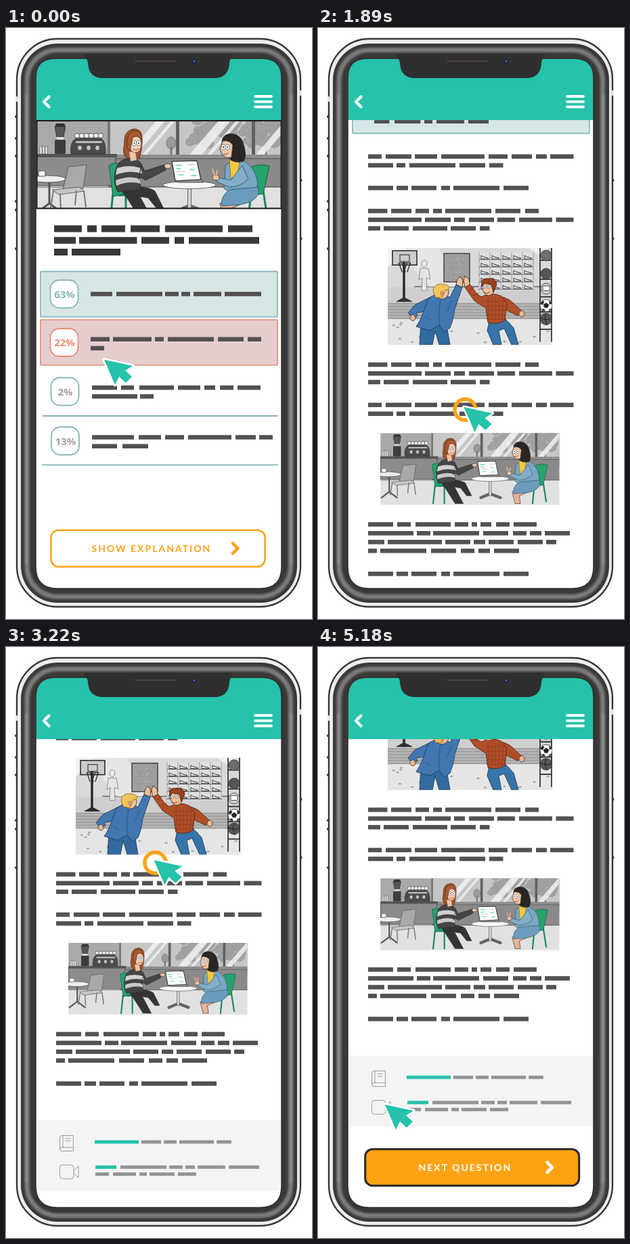
Animation of 452 by 873 pixels, one loop 5.25 s. Source, as an HTML page:

```html
<!DOCTYPE html>
<html lang="en">
<head>
<meta charset="utf-8">
<title>Quiz app walkthrough</title>
<style>
html, body { margin: 0; width: 100%; height: 100%; overflow: hidden; background: #fff; }
svg { display: block; width: 452px; height: 873px; }
.label { font: 700 14px Lato, sans-serif; letter-spacing: 2px; }
.badge { font: 700 15px "Open Sans", sans-serif; text-anchor: middle; }
.sign { font: 700 7px "Open Sans", sans-serif; text-anchor: middle; }
</style>
</head>
<body>
<svg id="stage" viewBox="0 0 452 873"></svg>
<script>
const TEAL = '#26c2aa', ORANGE = '#faa41a', INK = '#3a3837', BAR = '#545152', SOFT = '#86b5bd', RED = '#ec8a77';

const box = (x, y, x2, y2, fill, r = 0, extra = '') =>
  `<rect x="${x}" y="${y}" width="${x2 - x}" height="${y2 - y}" rx="${r}" fill="${fill}" ${extra}/>`;
const shape = (d, fill, stroke = '#333', w = 0.9) =>
  `<path d="${d}" fill="${fill}" stroke="${stroke}" stroke-width="${w}" stroke-linejoin="round"/>`;
const line = (d, stroke, w = 1) =>
  `<path d="${d}" fill="none" stroke="${stroke}" stroke-width="${w}" stroke-linecap="round" stroke-linejoin="round"/>`;
const oval = (x, y, rx, ry, fill, stroke = '#333', w = 0.8) =>
  `<ellipse cx="${x}" cy="${y}" rx="${rx}" ry="${ry}" fill="${fill}" stroke="${stroke}" stroke-width="${w}"/>`;
const eyes = (x, y, gap, r) => [0, gap].map(d =>
  oval(x + d, y, r, r * 1.2, '#fff', '#333', 0.5) + oval(x + d, y, r / 3, r / 3, '#222', 'none')).join('');
const many = (n, fn) => Array.from({ length: n }, (_, i) => fn(i)).join('');
let seed = 7;
const rnd = () => (seed = seed * 16807 % 2147483647) / 2147483647;

// A row of word bars: "start-end start-end ..."
const row = (y, words, h = 6.5, fill = BAR) => words.split(' ').map(w => {
  const [a, b] = w.split('-').map(Number);
  return box(a, y, b, y + h, fill);
}).join('');

const paraA = y =>
  row(y, '74-94 100-138 143-176 182-246 252-280 286-316 322-338 343-377.5') +
  row(y + 13, '74-111 116-129 135-203 209-247 253-273.5');
const paraB = y => row(y, '74-111 116-133 138-175 182-195 200-268 274-311');
const paraC = y =>
  row(y, '74-102.5 108-138 144-164 170-183 188-256 262-299 306-326') +
  row(y + 13, '74-153 158-196 201-217 223-260 265-291 297-346 351.5-377.5') +
  row(y + 25.7, '74-92 97-134 140-191 196-233 239-253.5');
const paraD = y =>
  row(y, '74-111 117-137 144-196 202-222 227-235 240-256 263-283 289-323') +
  row(y + 13, '74-141 146-166 170-238 244-281 288-308 313-330 335-372') +
  row(y + 26, '74-98 103-183 188-225 230-247 252-289 295-332 337-352') +
  row(y + 39, '74-87 92-160 167-204 211-231 237-254 260-297');

const streak = (x, w) => `<path d="M${x} 0h${w}l-58 68h${-w}z" fill="#f2f2f2" opacity=".85"/>`;

const cafe = () =>
  box(0, -3, 372, 70, '#a9a9a9') + box(104, -3, 372, 67, '#c6c6c6') +
  many(46, () => oval(226 + rnd() * 140, rnd() * 34, 5 + rnd() * 6, 5 + rnd() * 5, '#a2a2a2', '#8f8f8f', 0.4)) +
  oval(198, 33, 7, 9, '#9a9a9a', '#777') + line('M198 40v26M338 36v30', '#777', 3) +
  streak(176, 13) + streak(198, 6) + streak(268, 18) + streak(294, 6) + streak(366, 12) +
  box(205, -3, 210, 67, '#606060') + box(317, -3, 322, 67, '#606060') + box(104, -3, 108, 60, '#777') +
  box(106, 50, 372, 56, '#8e8e8e') + box(106, 56, 372, 98, '#8a8a8a', 0, 'stroke="#555"') +
  box(0, 98, 372, 150, '#e1e1e1') + line('M0 98H372', '#555') +
  box(0, 52, 116, 96, '#8c8c8c', 0, 'stroke="#444"') + box(0, 49, 118, 54, '#545454') +
  // grinder, cups and espresso machine
  shape('M26 8h16l-3 16h-10z', '#555') + box(29, 24, 39, 28, '#ddd') + box(26, 28, 42, 49, '#3c3c3c', 2) +
  box(27, 4, 41, 9, '#333', 2) + many(3, i => box(4 + i * 4, 38, 7 + i * 4, 49, '#ececec', 0, 'stroke="#555" stroke-width=".6"')) +
  shape('M50 49Q48 30 58 26H94Q102 30 101 49Z', '#4b4b4b') + box(57, 30, 96, 33, '#bcbcbc', 1) +
  many(3, i => oval(63 + i * 13, 40, 3.5, 4, '#c2c2c2')) + many(6, i => oval(59 + i * 7, 22, 4, 3.5, '#efefef')) +
  // empty table and chair
  line('M18 88V122M18 122L2 134M18 122L34 134', '#555', 3) + oval(16, 86, 26, 5, '#eee', '#444') +
  box(2, 74, 12, 82, '#f4f4f4', 2, 'stroke="#555"') +
  shape('M46 68L73 65L68 100L38 102Z', '#a9a9a9', '#555') + shape('M22 102L62 98L70 104L32 109Z', '#c6c6c6', '#555') +
  line('M24 104L20 128M34 109L35 130M69 104L72 127M58 104L56 124', '#777', 2) +
  // round table
  line('M225 98V128M225 126L206 134M225 126L246 134', '#666', 6) + line('M225 98V128', '#d4d4d4', 4) +
  // seated woman on the left
  line('M112 108L108 146M131 112V146M120 110L160 110', '#168a60', 3) +
  shape('M106 66Q114 61 121 64L129 108L112 112Z', '#24a46b', '#17583f') +
  shape('M122 100C140 95 165 97 174 104L187 130H177L164 114L152 112L170 146H153L134 116Z', '#343434') +
  shape('M121 62C128 54 146 54 152 61L159 74L188 65L190 73L160 88L152 83L153 101L119 105C111 90 114 70 121 62Z', '#454545') +
  shape('M118 70Q136 64 153 70L155 78Q136 72 116 80Z', '#d0d0d0', 'none') +
  shape('M116 88Q136 80 152 86L153 93Q136 88 117 96Z', '#c9c9c9', 'none') +
  line('M154 64L150 87', '#292929') + oval(193, 67, 5, 3.5, '#f0c6a9') +
  shape('M129 30C128 13 146 7 153 17C157 27 155 42 151 55L144 58L131 54C125 46 129 38 129 30Z', '#9c532e', '#5a2d18') +
  shape('M136 46H145L147 58L138 60Z', '#ecc2a5', 'none') +
  oval(145, 34, 9, 13, '#f4cfb5', '#8a5a40') +
  shape('M133 40C131 20 140 12 149 16Q155 19 155 28Q147 20 141 25Q139 34 137 44Z', '#a95a32', '#5a2d18') +
  eyes(143.500, 33, 6.5, 3.2) + line('M142 42Q147 45 150 41', '#8d3b30') +
  // seated woman on the right
  line('M316 104L312 146M334 104L340 142M300 112L334 106', '#168a60', 3) +
  shape('M313 70Q328 62 343 67L334 108L318 110Z', '#27a36c', '#17583f') +
  shape('M286 60C296 52 312 60 320 74C329 92 326 102 318 104L288 108L276 100L278 66Z', '#79a6c2', '#345a73') +
  shape('M284 58L300 56L296 78L286 86Z', '#f2c742', '#8e7221') +
  shape('M296 116L270 122L276 146H287L285 130L304 122Z', '#e9b392') +
  shape('M284 102L326 98C332 112 316 122 298 124L273 126Q270 112 284 102Z', '#6b9cbd', '#345a73') +
  shape('M303 66L312 86Q300 98 284 98L265 90L268 84L286 88Z', '#82aec8', '#345a73') +
  oval(264, 84, 5, 4, '#efc2a4') + line('M262 80L259 72M265 80L266 73', '#e5b292', 2) +
  shape('M273 32C272 16 298 14 304 32C308 44 309 54 305 60Q294 63 286 58Z', '#292624') +
  shape('M274 30Q284 28 289 36L287 54Q277 57 273 49L270 42Z', '#efc4a6') +
  eyes(275, 39, 6, 3.2) + line('M275 50Q279 51 282 48', '#8d3b30') +
  oval(225, 95, 39, 5.5, '#f7f7f7', '#444') +
  shape('M199 60L236 59L242 87L204 89Z', '#fdfdfd', '#444', 1.5) + shape('M204 89L243 87L246 91H208Z', '#999') +
  line('M205 66H214M206 71H212M226 72H232M228 81H235M209 80H216', '#63cfc0', 1.5) + line('M206 75H219M222 65H233', '#bbc');

const sports = () =>
  box(0, 0, 243, 143, '#d9d9d9') + box(0, 58, 243, 81, '#cfcfcf') + box(0, 81, 243, 105, '#b3b3b3') +
  box(0, 105, 243, 143, '#e5e5e5') + many(6, i => line(`M0 ${82 + i * 4.4}H243`, '#858585', 0.7)) +
  line('M40 57H243', '#666', 1.5) + shape('M15 0H75L105 57H60Z', '#e6e6e6', 'none') + shape('M0 0H28L0 28Z', '#f3f3f3', 'none') +
  many(26, () => oval(rnd() * 238, 110 + rnd() * 31, 2, 0.8, '#aaa', '#777', 0.4)) +
  // basketball stand
  box(7, 4, 43, 25, '#ccc', 0, 'stroke="#222" stroke-width="1.5"') + box(18, 10, 32, 20, 'none', 0, 'stroke="#222"') +
  line('M24 22V78', '#292929', 3.5) + shape('M13 79L24 73L36 79Z', '#2c2c2c') +
  line('M16 22H34M17 23L21 35M33 23L29 35M22 23L26 35M28 23L24 35', '#292929', 1.3) +
  // mannequin
  oval(54, 23, 4, 5, '#eaeaea', '#777') + shape('M48 30H60L63 46L57 44L58 63H50L51 44L46 47Z', '#e4e4e4', '#888') +
  // sign
  box(83, 8, 121, 50, '#9e9e9e', 0, 'stroke="#444" stroke-width="1.5"') +
  ['SPORT', 'LESSONS', 'SMART', 'SALE'].map((s, i) =>
    `<text class="sign" x="102" y="${18.5 + i * 8 + (i > 1 ? 3 : 0)}" fill="#ddd" stroke="#555" stroke-width=".25">${s}</text>`).join('') +
  // shoe shelves
  box(134, 6, 216, 63, '#dedede') +
  many(5, r => line(`M135 ${17 + r * 11}H215`, '#666') + many(5, c =>
    shape(`M${138 + c * 16} ${16 + r * 11}v-5l3 2 4 1q4 0 4 2z`, '#f5f5f5', '#333', 1))) +
  many(6, i => line(`M${135 + i * 16} 7V62`, '#8b8b8b', 0.8)) + shape('M208 0H236L243 10V22Z', '#efefef', 'none') +
  // ball rack
  line('M225 0V138M242 0V138M225 18H242M225 46H242M225 72H242M225 94H242M225 120H242', '#303030', 1.7) +
  oval(234, 11, 8, 8, '#6d6d6d') + oval(234, 38, 8, 8, '#555') + oval(234, 60, 8, 8, '#d3d3d3') + box(229, 56, 239, 63, '#fff', 1, 'stroke="#444"') +
  oval(234, 85, 9, 9, '#fff') + shape('M234 81l4 3-2 4h-4l-2-4z', '#222') +
  shape('M226 82l3-4 2 2-3 4zM239 78l3 4-3 1zM228 91l3-1 1 3zM238 92l2-2 1 1z', '#222') +
  oval(234, 105, 8.5, 8.5, '#575757') + line('M226 103Q234 108 242 104M234 97Q230 105 235 113', '#222') +
  // man in blue suit
  shape('M49 110L47 143H66L70 122L76 143H92L87 114Z', '#316a9f', '#1f3e5c') +
  shape('M64 72L40 84L30 96L38 105L44 100L42 96L60 92Z', '#4276b0', '#1f3e5c') + oval(37, 103, 4, 4.5, '#edb78f') +
  shape('M60 75C68 67 82 66 92 73L101 54L110 58L99 90C97 106 94 112 92 118L84 124L76 114L62 122L42 116C52 102 54 88 60 75Z', '#4276b0', '#1f3e5c') +
  line('M78 76Q74 94 77 114M94 78L88 94M56 102L64 106', '#2c587f') +
  shape('M101 54L103 45L107 42L111 48L110 58Z', '#f0bd97') +
  oval(80, 65, 10, 10.5, '#f0bd97') + shape('M68 67C63 52 82 50 91 57Q91 62 85 62L80 73L71 73Z', '#f2c45b', '#8c6a20') +
  oval(80, 67, 2, 3, '#e9ab84', '#a8653f') +
  // man in checked shirt
  shape('M150 107L147 122L156 143H168L164 122L172 119L183 143H193L186 118L173 104Z', '#3674a9', '#1f3e5c') +
  shape('M164 71Q180 74 187 83L198 93L192 100L176 92L164 92Z', '#b04e29', '#5d2713') + oval(198, 97, 4, 4.5, '#edb78f') +
  shape('M138 72Q154 64 168 71L176 82L173 107Q162 114 148 110L145 89L128 78L114 58L121 53L132 68Z', '#b04e29', '#5d2713') +
  many(5, i => line(`M146 ${79 + i * 6.5}H173M${148 + i * 5.6} 73L${149 + i * 5} 107`, '#8d3c1d', 0.8)) +
  line('M121 62L127 58M126 70L134 67', '#7d3217') +
  shape('M114 58L112 48L114 41L120 46L121 54Z', '#f0bd97') +
  oval(149, 59, 9, 11, '#f0bd97') + shape('M139 57Q136 44 148 45Q160 44 161 54L156 65L153 54L142 52Z', '#98421f', '#522310') +
  eyes(143, 57, 6, 2.3) + line('M142 65Q146 69 150 65', '#7c2f25');

const badge = (x, y, text, edge, color) =>
  box(x - 20.5, y - 20.5, x + 20.5, y + 20.5, '#fff', 13, `stroke="${edge}" stroke-width="1.8"`) +
  `<text class="badge" x="${x + 0.5}" y="${y + 5.5}" fill="${color}">${text}</text>`;
const chevron = (x, y, color) => line(`M${x} ${y - 7.5}l7.5 7.5 -7.5 7.5`, color, 4.5);
const button = (x, y, text, tx, cx, fill, edge, ink, w) =>
  box(x, y, x + 316, y + 54, fill, 11, `stroke="${edge}" stroke-width="${w}"`) +
  `<text class="label" x="${tx}" y="${y + 32}" fill="${ink}">${text}</text>` + chevron(cx, y + 27, ink);
const showButton = (...look) => button(66.5, 741.7, 'SHOW EXPLANATION', 126.5, 335, ...look);

const question = () =>
  box(44, 136, 408, 830, '#fff') +
  '<g clip-path="url(#banner)"><use href="#cafe" x="46" y="137"/></g>' +
  box(45.5, 137, 406.5, 266.5, 'none', 0, 'stroke="#191919" stroke-width="2"') +
  row(291.5, '71-112 120-134 141-176 184-227 235-320 328-364', 10, INK) +
  row(308.7, '71-103 108-193.5 200-241 249-263 270-374', 10, INK) +
  row(326, '71-91 97-169', 10, INK) +
  box(51, 359.7, 401, 426.7, '#d6e6e5', 1, `stroke="${SOFT}" stroke-width="1.7"`) +
  box(51, 431, 401, 498, '#e5cdce', 1, `stroke="${RED}" stroke-width="1.7"`) +
  badge(86, 393, '63%', SOFT, SOFT) + badge(86, 464.5, '22%', RED, RED) +
  badge(87, 537, '2%', SOFT, '#a3a1a1') + badge(87.5, 610, '13%', SOFT, '#a3a1a1') +
  line('M54 573H401M54 645.3H401', '#82b5b8', 1.8) +
  row(389.7, '125-157 163-231 235-255 259-272 277-318 323-377') +
  row(456.5, '125-153 158-215 220-233 239-307 313-351 357-377') + row(469.7, '125-145') +
  row(528, '127-164 170-189 197-248 254-287 293-309 316-336 342-376') + row(541, '127-194 198-218') +
  row(601.3, '127-189 196-229 235-263 269-333 339-369 374-394') + row(614.5, '127-164 172-210') +
  showButton('#fff', ORANGE, ORANGE, 2.6) +
  `<g id="pressed">${showButton('#ffa313', '#2b2724', '#fff', 3)}</g>`;

const explanation = () =>
  row(164.5, '81-152.5 160-187 194-237.5 245-330 338-374', 10, INK) +
  row(182, '81-113 120-203 210-251 259-273', 10, INK) +
  box(51, 225, 401, 283, '#d6e6e5', 1, `stroke="${SOFT}" stroke-width="1.7"`) +
  row(244.7, '83-118.5 125-202 207-229 234-248.5 254-300 306-367', 8) +
  row(260.5, '83-105.5 113-151.5 157-169 175-216 222-252', 8) +
  paraA(314) + paraB(360.5) + paraC(394.5) +
  '<use href="#sports" x="103" y="452.5"/>' +
  paraC(621.5) + paraA(681) +
  '<g clip-path="url(#inset)"><use href="#cafe" transform="translate(92.3 724.8) scale(.72)"/></g>' +
  paraD(857.5) + paraB(930.5) +
  box(46.5, 988, 408, 1093, '#f4f4f4') +
  line('M99 1010.5H83q-3.5 0-3.5 3.5v16q0 3.5 3.5 3.5H99zM99 1028H83q-3.5 0-3.5 3M84 1010.5V1028M88 1015h7M88 1018.5h7', '#9b9b9b') +
  box(79.5, 1054, 100, 1074.5, 'none', 4, 'stroke="#9b9b9b"') + line('M100 1062l7-6.5v17l-7-6', '#9b9b9b') +
  row(1017.5, '131-196', 5, TEAL) + row(1017.5, '200-229 233-252 256-307 311-333', 5, '#949494') +
  row(1054.7, '132-163', 5, TEAL) + row(1054.7, '169-237 241-261 265-279 283-324 329-374', 5, '#949494') +
  row(1065, '132-152 158-192 197-208 212-249 254-281', 5, '#949494') +
  button(69.7, 1126, 'NEXT QUESTION', 148.5, 338.5, '#ffa313', '#2b2724', '#fff', 3);

const SCREEN = 'M44 74Q44 45 73 45H378Q407 45 407 74V796Q407 828 375 828H76Q44 828 44 796Z';
const phone = () =>
  [131, 163, 189, 256, 269, 326].map(y => oval(14.5, y, 1.5, 2, INK, 'none')).join('') +
  [225, 311].map(y => oval(436, y, 1.5, 2, INK, 'none')).join('') +
  box(16, 16, 435, 855, '#ededed', 60, `stroke="${INK}" stroke-width="2.4"`) +
  box(22, 23, 430, 849, INK, 54) +
  '<g filter="url(#soft)">' +
  box(31, 32.5, 420.5, 840, 'none', 45, 'stroke="#7c7c7c" stroke-width="7"') +
  line('M30 100V790M421.500 100V790', '#999', 2.5) + '</g>' +
  line('M16 103v4M435 94v4', '#e6e6e6', 4);
const notch = () =>
  shape('M116 44Q121 46 121 52Q122 74 144 74H307Q329 74 330 52Q330 46 335 44V38H116Z', '#302f2f', 'none') +
  line('M191 49H250', '#4d423b', 2) + oval(278, 49.5, 3.2, 3.2, '#152d5c', '#222') + oval(278, 49, 1.3, 1.3, '#4676c4', 'none');

const stage = document.getElementById('stage');
stage.innerHTML = `<defs>
  <clipPath id="screen"><path d="${SCREEN}"/></clipPath>
  <clipPath id="body">${box(44, 136, 408, 830, '#000')}</clipPath>
  <clipPath id="banner">${box(46, 137, 406, 266, '#000')}</clipPath>
  <clipPath id="inset">${box(92, 726, 356.5, 832, '#000')}</clipPath>
  <clipPath id="frame">${box(0, 0, 243, 143, '#000')}</clipPath>
  <filter id="soft" filterUnits="userSpaceOnUse" x="0" y="0" width="452" height="873"><feGaussianBlur stdDeviation="1.4"/></filter>
  <g id="cafe">${cafe()}</g>
  <g id="sports" clip-path="url(#frame)">${sports()}</g>
</defs>
${box(0, 0, 452, 873, '#fff')}
${phone()}
<g clip-path="url(#screen)">
  ${box(44, 45, 408, 830, '#fff')}
  <g clip-path="url(#body)"><g id="question">${question()}</g><g id="explanation">${explanation()}</g></g>
  ${box(44, 45, 408, 136, TEAL)}
  ${line('M63.5 101.5L56 109l7.5 7.5', '#fff', 4.3)}
  ${line('M368 101H392M368 108.8H392M368 116.5H392', '#fff', 3.8)}
</g>
<path d="${SCREEN}" fill="none" stroke="#302e2d" stroke-width="1.5"/>
${notch()}
<g id="cursor">
  <circle id="ring" cx="2" cy="3.8" r="15.5" fill="none" stroke="${ORANGE}" stroke-width="5.5"/>
  <g stroke-linejoin="round">
    <path d="M1 2L43 11 32 18 42 27 33 36 23 27 17 40Z" fill="#888" opacity=".35" filter="blur(1px)"/>
    <path d="M0 0L42 9 31 16 41 25 32 34 22 25 16 37Z" fill="${TEAL}" stroke="#fff" stroke-width="5" paint-order="stroke"/>
  </g>
</g>`;

const $ = id => document.getElementById(id);
const show = (id, on) => $(id).setAttribute('display', on ? 'inline' : 'none');
const part = (t, a, b) => Math.min(1, Math.max(0, (t - a) / (b - a)));
const LOOP = 5250, STEP = 70;
// Cursor stops: answer, button, end of the drag, video icon
const STOPS = [[145, 490], [213, 766.4], [220.2, 170], [99, 676]];
const LEGS = [[0, 490], [770, 4006], [4200, 4900]];

function draw(time) {
  const t = Math.floor(time % LOOP / STEP) * STEP;
  let [x, y] = STOPS[0];
  LEGS.forEach(([a, b], i) => {
    const k = part(t, a, b);
    x += (STOPS[i + 1][0] - STOPS[i][0]) * k;
    y += (STOPS[i + 1][1] - STOPS[i][1]) * k;
  });
  const scroll = 8.5 - 392.8 * part(t, 770, 4006);
  show('question', t < 630);
  show('pressed', t >= 560);
  show('explanation', t >= 630);
  show('ring', t >= 770 && t < 4060 || t >= 5110 && t < 5180);
  $('explanation').setAttribute('transform', `translate(0 ${scroll.toFixed(2)})`);
  $('cursor').setAttribute('transform', `translate(${x.toFixed(2)} ${y.toFixed(2)})`);
}

const start = performance.now();
function tick() {
  draw(performance.now() - start);
  requestAnimationFrame(tick);
}
draw(0);
tick();
</script>
</body>
</html>
```
